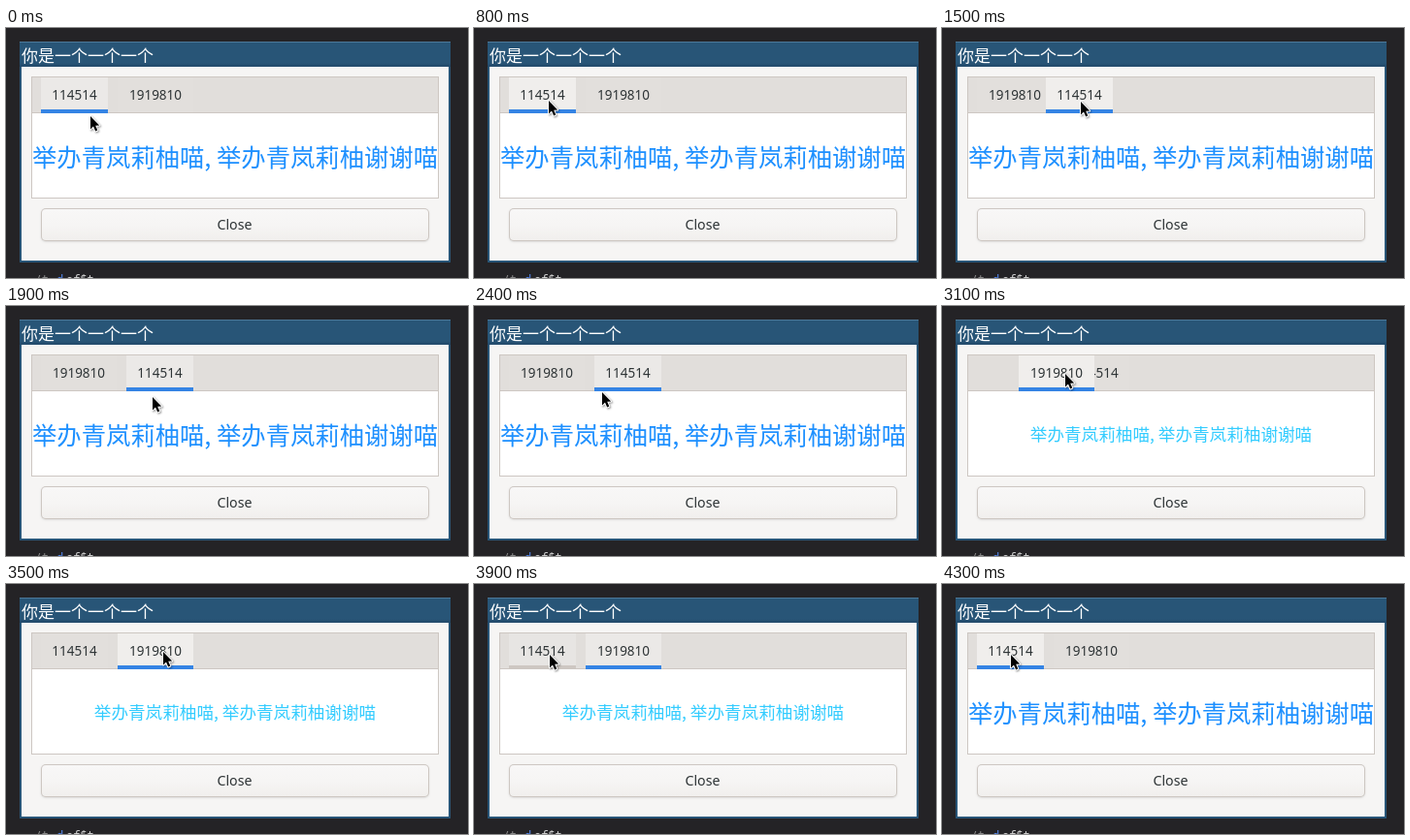
Write an HTML page with a canvas that moves like this. It is 476 px wide and 258 px high and loops after 4.8 s.

```html
<!DOCTYPE html>
<html lang="zh">
<head>
<meta charset="utf-8">
<title>Reorderable tabs</title>
<style>
  html, body { margin: 0; width: 100%; height: 100%; overflow: hidden; background: #242326; }
  canvas { display: block; width: 476px; height: 258px; }
</style>
</head>
<body>
<canvas id="stage"></canvas>
<script>
const W = 476, H = 258, LOOP = 4800, STEP = 100;
const canvas = document.getElementById('stage');
const ctx = canvas.getContext('2d');
const dpr = window.devicePixelRatio || 1;
canvas.width = W * dpr;
canvas.height = H * dpr;

const CJK = '"Noto Sans CJK SC", "Noto Sans CJK", sans-serif';
const SANS = '"Noto Sans", "Open Sans", sans-serif';
const MONO = '"Noto Sans Mono", monospace';
const MESSAGE = '举办青岚莉柚喵, 举办青岚莉柚谢谢喵';
const EDGE = '#cdc7c2', INK = '#2e3436', ACCENT = '#3584e4';

const TABS = { a: { label: '114514', w: 69 }, b: { label: '1919810', w: 78 } };
const FIRST = 36, GAP = 10, BAR_TOP = 51, BAR_END = 88;

const smooth = k => k * k * (3 - 2 * k);
const easeOut = k => 1 - (1 - k) ** 3;

const HOME = { x: 86, y: 90 };
const GLIDES = [
  { from: 400, to: 800, x: 76, y: 74, ease: smooth },
  { from: 1100, to: 1700, x: 165, y: 75, ease: smooth },
  { from: 1700, to: 2100, x: 148, y: 95, ease: easeOut },
  { from: 2200, to: 2800, x: 83, y: 69, ease: smooth },
  { from: 2800, to: 3400, x: 168, y: 69, ease: smooth },
  { from: 3400, to: 4000, x: 70, y: 72, ease: smooth }
];

// Each drag carries the left tab to the right; grab is the pointer's offset in it
const DRAGS = [
  { id: 'a', from: 1300, to: 1800, grab: 35 },
  { id: 'b', from: 3000, to: 3500, grab: 47 }
];

const otherOf = id => id === 'a' ? 'b' : 'a';

function pointerAt(t) {
  let { x, y } = HOME;
  for (const g of GLIDES) {
    if (t <= g.from) break;
    const k = g.ease(Math.min(1, (t - g.from) / (g.to - g.from)));
    x += (g.x - x) * k;
    y += (g.y - y) * k;
  }
  return { x: Math.round(x), y: Math.round(y) };
}

function stateAt(t) {
  const p = pointerAt(t);
  const active = t >= 2900 && t < 4300 ? 'b' : 'a';
  let order = 'ab', drag = null;
  for (const { id, from, to, grab } of DRAGS) {
    if (t < from) break;
    if (t < to) drag = p.x - grab;
    const other = otherOf(id);
    if (t >= to || drag > FIRST + GAP + TABS[other].w / 2) order = other + id;
  }
  return { p, active, order, drag };
}

function rect(x, y, w, h, color) {
  ctx.fillStyle = color;
  ctx.fillRect(x, y, w, h);
}

function frame(x, y, w, h, color) {
  ctx.strokeStyle = color;
  ctx.lineWidth = 1;
  ctx.strokeRect(x + .5, y + .5, w - 1, h - 1);
}

function text(s, x, y, size, family, color, align = 'left') {
  ctx.font = size + 'px ' + family;
  ctx.textAlign = align;
  ctx.fillStyle = color;
  ctx.fillText(s, x, y);
}

function roundRect(x, y, w, h, r) {
  ctx.beginPath();
  ctx.moveTo(x + r, y);
  ctx.arcTo(x + w, y, x + w, y + h, r);
  ctx.arcTo(x + w, y + h, x, y + h, r);
  ctx.arcTo(x, y + h, x, y, r);
  ctx.arcTo(x, y, x + w, y, r);
  ctx.closePath();
}

function fade(y0, y1, ...colors) {
  const g = ctx.createLinearGradient(0, y0, 0, y1);
  colors.forEach((c, i) => g.addColorStop(i / (colors.length - 1), c));
  return g;
}

function drawWindow() {
  rect(0, 0, W, H, '#242326');
  text('~ ./t', 8, 264, 12, MONO, '#8a8a8a');
  text('d', 52, 264, 12, MONO, '#5588ee');
  text('of$t', 62, 264, 12, MONO, '#d0d0d0');
  rect(14, 14, 444, 228, '#285577');
  rect(14, 14, 444, 1, '#4c7899');
  rect(14, 36, 444, 4, fade(36, 40, '#285577', '#22496a'));
  rect(16, 40, 440, 200, '#f6f5f4');
  text('你是一个一个一个', 16, 35, 17, CJK, '#ffffff');
}

function drawButton() {
  ctx.save();
  ctx.shadowColor = 'rgba(0,0,0,.1)';
  ctx.shadowOffsetY = dpr;
  ctx.shadowBlur = 2 * dpr;
  roundRect(36, 186, 400, 34, 5);
  ctx.fillStyle = EDGE;
  ctx.fill();
  ctx.restore();
  roundRect(37, 187, 398, 32, 4);
  ctx.fillStyle = fade(187, 219, '#f8f7f7', '#f6f5f4', '#f1efed');
  ctx.fill();
  text('Close', 235.5, 208, 14.2, SANS, INK, 'center');
}

function drawTab(id, x, active, hover) {
  const { label, w } = TABS[id];
  const fill = active ? (hover ? '#f0eeec' : '#ebe9e7') : (hover ? '#e7e5e3' : '#e2dfdc');
  rect(x, BAR_TOP, w, BAR_END - BAR_TOP - 1, fill);
  if (active || hover) rect(x, BAR_END - 4, w, 4, active ? ACCENT : EDGE);
  text(label, x + w / 2, 74, 13.5, SANS, INK, 'center');
}

function drawNotebook({ p, active, order, drag }) {
  rect(26, 50, 420, 126, '#ffffff');
  rect(27, BAR_TOP, 418, 36, '#e1dedb');
  rect(27, 87, 418, 1, EDGE);
  frame(26, 50, 420, 126, EDGE);

  const left = {};
  let x = FIRST;
  for (const id of order) {
    left[id] = x;
    x += TABS[id].w + GAP;
  }
  if (drag !== null) left[active] = drag;
  const over = id => drag !== null ? id === active :
    p.y >= BAR_TOP && p.y < BAR_END && p.x >= left[id] && p.x < left[id] + TABS[id].w;
  const other = otherOf(active);
  drawTab(other, left[other], false, over(other));
  drawTab(active, left[active], true, over(active));

  if (active === 'a') text(MESSAGE, 236, 142.5, 25.34, CJK, '#1e90ff', 'center');
  else text(MESSAGE, 236, 139, 17.6, CJK, '#33ccff', 'center');
}

const ARROW = [[0, 0], [0, 13.5], [3, 10.6], [5.2, 15.5], [7.3, 14.6], [5.2, 9.8], [9.2, 9.6]];

function drawPointer({ x, y }) {
  ctx.save();
  ctx.translate(x + 1, y + 1);
  ctx.beginPath();
  ARROW.forEach(([px, py]) => ctx.lineTo(px, py));
  ctx.closePath();
  ctx.lineJoin = 'round';
  ctx.lineWidth = 2;
  ctx.strokeStyle = '#ffffff';
  ctx.shadowColor = 'rgba(0,0,0,.4)';
  ctx.shadowBlur = 2 * dpr;
  ctx.shadowOffsetX = ctx.shadowOffsetY = dpr;
  ctx.stroke();
  ctx.shadowColor = 'transparent';
  ctx.fillStyle = '#000000';
  ctx.fill();
  ctx.restore();
}

function draw(now) {
  const t = Math.floor((now % LOOP) / STEP) * STEP;
  const state = stateAt(t);
  ctx.setTransform(dpr, 0, 0, dpr, 0, 0);
  drawWindow();
  drawNotebook(state);
  drawButton();
  drawPointer(state.p);
}

const start = performance.now();
function tick() {
  draw(performance.now() - start);
  requestAnimationFrame(tick);
}
tick();
</script>
</body>
</html>
```
